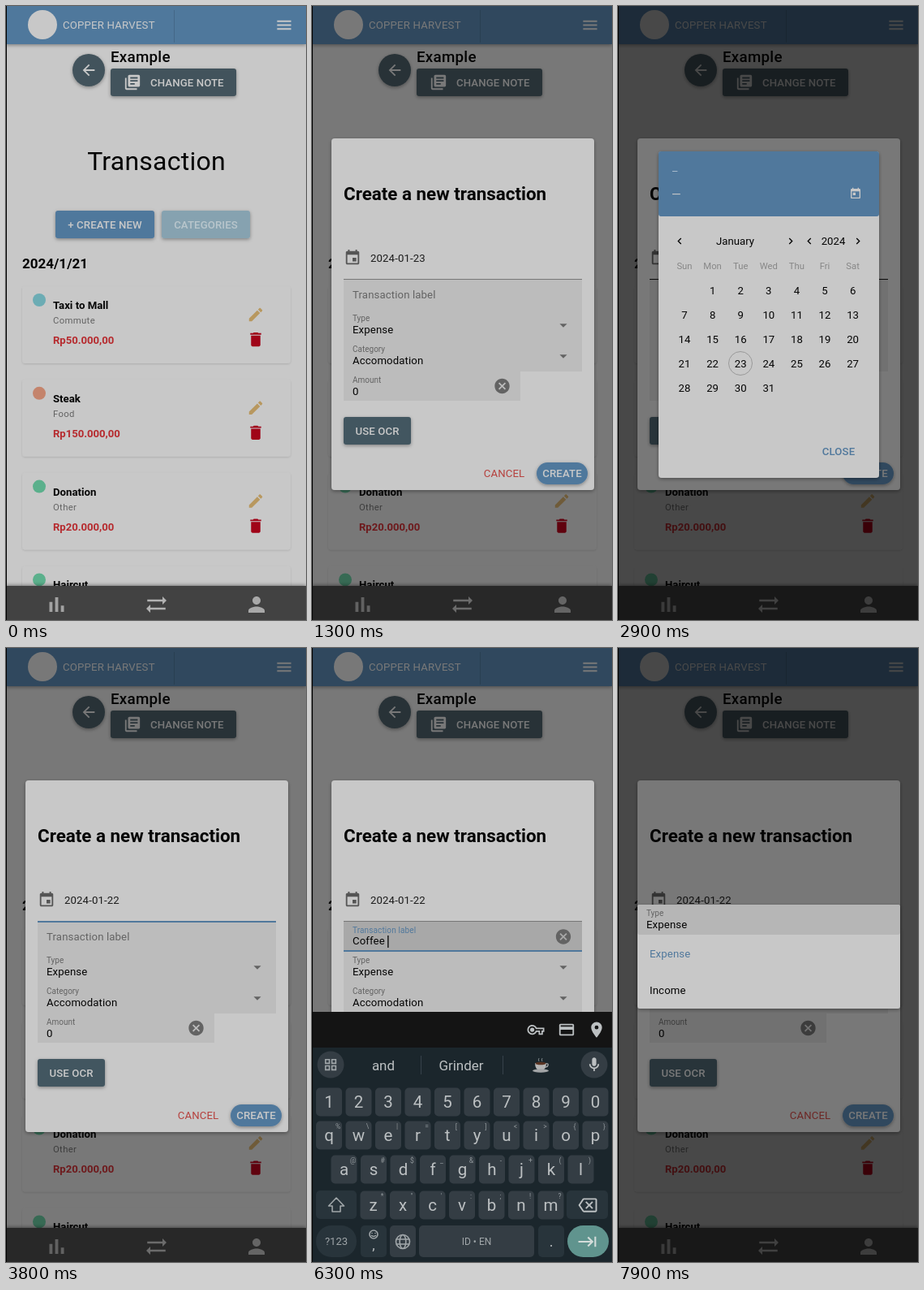
Recreate the animation shown at these times as an HTML page. Size 370 by 756 pixels, loop 8 s.

```html
<!DOCTYPE html>
<html lang="en">
<head>
<meta charset="utf-8">
<title>Expense tracker demo</title>
<style>
html, body { margin: 0; width: 100%; height: 100%; overflow: hidden; background: #000; }
svg { display: block; width: 370px; height: 756px; font-family: Roboto, Arial, sans-serif; }
text { white-space: pre; }
.scale { transform-box: fill-box; transform-origin: center; }
</style>
</head>
<body>
<svg id="stage" viewBox="0 0 370 756"></svg>
<script>
const LOOP = 8000;
const PAPER = '#c8c8c8', BLUE = '#50789c', SLATE = '#43535b', GREY = '#636363', INK = '#050505';
const ICONS = {
  menu: 'M3 18h18v-2H3zm0-5h18v-2H3zm0-7v2h18V6z',
  back: 'M20 11H7.83l5.59-5.59L12 4l-8 8 8 8 1.41-1.41L7.83 13H20z',
  books: 'M4 6H2v14c0 1.1.9 2 2 2h14v-2H4zm16-4H8c-1.1 0-2 .9-2 2v12c0 1.1.9 2 2 2h12c1.1 0 2-.9 2-2V4c0-1.1-.9-2-2-2zm-1 9H9V9h10zm-4 4H9v-2h6zm4-8H9V5h10z',
  edit: 'M3 17.25V21h3.75L17.81 9.94l-3.75-3.75zM20.71 7.04c.39-.39.39-1.02 0-1.41l-2.34-2.34c-.39-.39-1.02-.39-1.41 0l-1.83 1.83 3.75 3.75z',
  bin: 'M6 19c0 1.1.9 2 2 2h8c1.1 0 2-.9 2-2V7H6zM19 4h-3.5l-1-1h-5l-1 1H5v2h14z',
  chart: 'M4 9.2h3.4V20H4zM10.3 4h3.4v16h-3.4zM16.6 13H20v7h-3.4z',
  swap: 'M22 8l-4-4v3H3v2h15v3zM2 16l4 4v-3h15v-2H6v-3z',
  person: 'M12 12c2.21 0 4-1.79 4-4s-1.79-4-4-4-4 1.79-4 4 1.79 4 4 4zm0 2c-2.67 0-8 1.34-8 4v2h16v-2c0-2.66-5.33-4-8-4z',
  event: 'M17 12h-5v5h5zM16 1v2H8V1H6v2H5c-1.1 0-2 .9-2 2v14c0 1.1.9 2 2 2h14c1.1 0 2-.9 2-2V5c0-1.1-.9-2-2-2h-1V1zm3 18H5V8h14z',
  today: 'M19 3h-1V1h-2v2H8V1H6v2H5c-1.1 0-2 .9-2 2v14c0 1.1.9 2 2 2h14c1.1 0 2-.9 2-2V5c0-1.1-.9-2-2-2zm0 16H5V8h14zM7 10h5v5H7z',
  cancel: 'M12 2C6.47 2 2 6.47 2 12s4.47 10 10 10 10-4.47 10-10S17.53 2 12 2zm5 13.59L15.59 17 12 13.41 8.41 17 7 15.59 10.59 12 7 8.41 8.41 7 12 10.59 15.59 7 17 8.41 13.41 12z',
  drop: 'M7 10l5 5 5-5z',
  prev: 'M15.41 7.41L14 6l-6 6 6 6 1.41-1.41L10.83 12z',
  next: 'M10 6L8.59 7.41 13.17 12l-4.58 4.59L10 18l6-6z',
  key: 'M22 19h-6v-4h-2.68c-1.14 2.42-3.6 4-6.32 4-3.86 0-7-3.14-7-7s3.14-7 7-7c2.72 0 5.17 1.58 6.32 4H24v6h-2zm-4-2h2v-4h2v-2H11.94l-.23-.67C11.01 8.34 9.11 7 7 7c-2.76 0-5 2.24-5 5s2.24 5 5 5c2.11 0 4.01-1.34 4.71-3.33l.23-.67H18zM7 15a3 3 0 110-6 3 3 0 010 6z',
  card: 'M20 4H4c-1.1 0-2 .9-2 2v12c0 1.1.9 2 2 2h16c1.1 0 2-.9 2-2V6c0-1.1-.9-2-2-2zm0 14H4v-6h16zm0-10H4V6h16z',
  pin: 'M12 2C8.13 2 5 5.13 5 9c0 5.25 7 13 7 13s7-7.75 7-13c0-3.87-3.13-7-7-7zm0 9.5a2.5 2.5 0 110-5 2.5 2.5 0 010 5z',
  palette: 'M12 3a9 9 0 000 18c.83 0 1.5-.67 1.5-1.5 0-.39-.15-.74-.39-1.01-.23-.26-.38-.61-.38-.99 0-.83.67-1.5 1.5-1.5H16c2.76 0 5-2.24 5-5 0-4.42-4.03-8-9-8zM6.5 12a1.5 1.5 0 110-3 1.5 1.5 0 010 3zm3-4a1.5 1.5 0 110-3 1.5 1.5 0 010 3zm5 0a1.5 1.5 0 110-3 1.5 1.5 0 010 3zm3 4a1.5 1.5 0 110-3 1.5 1.5 0 010 3z',
  mic: 'M12 14c1.66 0 3-1.34 3-3V5c0-1.66-1.34-3-3-3S9 3.34 9 5v6c0 1.66 1.34 3 3 3zm5-3c0 2.76-2.24 5-5 5s-5-2.24-5-5H5c0 3.53 2.61 6.43 6 6.92V21h2v-3.08c3.39-.49 6-3.39 6-6.92z',
  erase: 'M22 3H7c-.69 0-1.23.35-1.59.88L0 12l5.41 8.11c.36.53.9.89 1.59.89h15c1.1 0 2-.9 2-2V5c0-1.1-.9-2-2-2zm0 16H7.07L2.4 12l4.66-7H22zm-11.59-2L14 13.41 17.59 17 19 15.59 15.41 12 19 8.41 17.59 7 14 10.59 10.41 7 9 8.41 12.59 12 9 15.59z',
  tab: 'M11.59 7.41L15.17 11H1v2h14.17l-3.59 3.59L13 18l6-6-6-6zM20 6v12h2V6z',
  grid: 'M3 3h8v8H3zm2 2v4h4V5zM13 3h8v8h-8zm2 2v4h4V5zM3 13h8v8H3zm2 2v4h4v-4zM13 13h8v8h-8zm2 2v4h4v-4z'
};

const rect = (x, y, w, h, fill, r = 0, more = '') =>
  `<rect x="${x}" y="${y}" width="${w}" height="${h}" rx="${r}" fill="${fill}" ${more}/>`;
const dot = (x, y, r, fill, more = '') => `<circle cx="${x}" cy="${y}" r="${r}" fill="${fill}" ${more}/>`;
const text = (x, y, s, size = 13.2, fill = INK, weight = 400, more = '') =>
  `<text x="${x}" y="${y}" font-size="${size}" fill="${fill}" font-weight="${weight}" ${more}>${s}</text>`;
const mid = (x, y, s, size, fill, weight, more = '') =>
  text(x, y, s, size, fill, weight, 'text-anchor="middle" ' + more);
const icon = (name, x, y, size, fill) =>
  `<path d="${ICONS[name]}" fill="${fill}" fill-rule="evenodd" transform="translate(${x - size / 2} ${y - size / 2}) scale(${size / 24})"/>`;
const group = (id, body, more = '') => `<g id="${id}" ${more}>${body}</g>`;
const shade = id => rect(0, 0, 370, 756, '#000', 0, `id="${id}"`);
const shadow = (id, dy, blur, alpha) =>
  `<filter id="${id}" x="-20%" y="-20%" width="140%" height="150%"><feDropShadow dx="0" dy="${dy}" stdDeviation="${blur}" flood-opacity="${alpha}"/></filter>`;
const SOFT = 'filter="url(#soft)"', TRACK = 'letter-spacing=".12"';

function button(x, y, w, h, label, fill, r = 3, color = PAPER) {
  return rect(x, y, w, h, fill, r, SOFT) + mid(x + w / 2, y + h / 2 + 4.7, label, 13.2, color, 500, TRACK);
}

function entry(i, name, kind, cost, color) {
  const y = 345 + i * 114.8;
  return rect(20, y, 331, 95, PAPER, 4, 'filter="url(#faint)"') + dot(41, y + 17, 8, color) +
    text(58, y + 28, name, 13.2, INK, 700) +
    text(58, y + 46, kind, 11.3, GREY, 400, 'letter-spacing=".35"') +
    text(58, y + 71, cost, 13.1, '#b62a2e', 700) +
    icon('edit', 308, y + 35, 22, '#b8985f') + icon('bin', 308, y + 65.5, 23, '#a00418');
}

function page() {
  return rect(0, 0, 370, 756, PAPER) +
    rect(0, 0, 370, 47, BLUE, 0, SOFT) + rect(207, 5, 1, 40, '#000', 0, 'opacity=".13"') +
    dot(45, 23, 18, PAPER) + text(70, 28, 'COPPER HARVEST', 13.2, PAPER, 400, 'letter-spacing=".2"') +
    icon('menu', 343, 23.5, 23, PAPER) +
    dot(102, 79, 20, SLATE, SOFT) + icon('back', 102, 79, 22, PAPER) +
    text(129, 69, 'Example', 18.8, INK, 500, 'letter-spacing=".24"') +
    rect(129, 77, 155, 34, SLATE, 3, SOFT) + icon('books', 156, 94, 22, PAPER) +
    text(178, 98.5, 'CHANGE NOTE', 13.2, PAPER, 500, TRACK) +
    mid(185.5, 202, 'Transaction', 32, INK, 400, 'letter-spacing=".23"') +
    button(61, 252, 122, 34, '+ CREATE NEW', BLUE) +
    rect(61, 252, 122, 34, '#fff', 3, 'id="press"') +
    button(192, 252, 109, 34, 'CATEGORIES', '#86a2b0', 3, '#b9c6cc') +
    text(20, 323, '2024/1/21', 17, INK, 700) +
    entry(0, 'Taxi to Mall', 'Commute', 'Rp50.000,00', '#6cacb4') +
    entry(1, 'Steak', 'Food', 'Rp150.000,00', '#c4846c') +
    entry(2, 'Donation', 'Other', 'Rp20.000,00', '#5bb08c') +
    entry(3, 'Haircut', 'Other', 'Rp40.000,00', '#5bb08c') +
    rect(0, 714, 370, 42, '#424242', 0, 'filter="url(#up)"') + icon('chart', 62.5, 737, 27, '#a2a2a2') +
    icon('swap', 185.5, 737, 30, '#b2b2b2') + icon('person', 309, 737, 30, '#a8a8a8');
}

function field(y, label, value) {
  return text(50, y, label, 10, GREY) + text(50, y + 15, value, 13.2, INK, 400, TRACK);
}

function form() {
  const fill = '#bcbcbc';
  return rect(24, 163, 324, 433, PAPER, 4, SOFT) +
    text(39, 239, 'Create a new transaction', 22.4, INK, 700) +
    icon('event', 50, 310, 22, '#555') +
    text(72, 314.6, '2024-01-23', 13.2, '#1c1c1c', 400, TRACK + ' id="date"') +
    rect(39, 337, 294, 113, fill) + rect(39, 450, 218, 36, fill) +
    rect(39, 337, 294, 37, '#a8a8a8', 0, 'id="focusFill"') +
    rect(39, 336, 294, 1, '#777', 0, 'id="dateLine"') +
    rect(39, 372, 294, 2, BLUE, 0, 'id="focusLine"') +
    text(50, 360, 'Transaction label', 13.2, GREY, 400, TRACK + ' id="label"') +
    text(50, 365, '', 13.2, INK, 400, TRACK + ' id="value"') +
    rect(50, 354, 1.3, 15, INK, 0, 'id="caret"') +
    group('clear', icon('cancel', 310, 355.5, 22, GREY)) +
    field(388, 'Type', 'Expense') + icon('drop', 310, 393, 22, GREY) +
    field(426, 'Category', 'Accomodation') + icon('drop', 310, 431, 22, GREY) +
    field(464, 'Amount', '0') + icon('cancel', 234.5, 468, 22, GREY) +
    button(39, 506, 83, 34, 'USE OCR', '#435761') +
    mid(237, 580, 'CANCEL', 13.2, '#b6423f', 400, TRACK) +
    button(277, 562, 63, 27, 'CREATE', BLUE, 13.5);
}

function calendar() {
  const colX = c => 82 + c * 34.6;
  let s = rect(50, 179, 272, 402, PAPER, 4, SOFT) + rect(50, 179, 272, 80, BLUE, 3) +
    text(66, 208, '–', 13, '#a9bccd', 400, 'id="pickYear"') + text(66, 237, '—', 15, PAPER, 400, 'id="pickDay"') +
    icon('today', 293, 231, 16, PAPER) +
    icon('prev', 76, 289.5, 16, INK) + mid(144.5, 294, 'January') + icon('next', 213, 289.5, 16, INK) +
    icon('prev', 236, 289.5, 16, INK) + mid(265.5, 294, '2024') + icon('next', 296, 289.5, 16, INK) +
    dot(151, 440, 14.5, 'none', 'stroke="#999"') + dot(colX(1), 440, 14.5, BLUE, 'id="picked"');
  'Sun Mon Tue Wed Thu Fri Sat'.split(' ').forEach((d, c) => s += mid(colX(c), 323.5, d, 11.3, '#878787'));
  for (let d = 1; d <= 31; d++)
    s += mid(colX(d % 7), 354.5 + Math.floor(d / 7) * 30, d, 13.2, INK, 400, d === 22 ? 'id="day22"' : '');
  return s + mid(272, 553, 'CLOSE', 13.2, BLUE, 500, TRACK);
}

function options() {
  return rect(24, 316, 324, 128, PAPER, 3, SOFT) + rect(24, 316, 324, 37, '#b6b6b6', 3) +
    text(35, 330, 'Type', 10, GREY) + text(35, 345, 'Expense', 13.2, INK, 400, TRACK) +
    text(39, 381, 'Expense', 13.2, BLUE, 400, TRACK) + text(39, 426, 'Income', 13.2, INK, 400, TRACK);
}

const KEY = '#343d44', DARK = '#28343b', LIGHT = '#bcc0c2', DULL = '#a0a6a9';
const keySpots = {};

function keyRow(chars, hints, x0, y) {
  return [...chars].map((c, i) => {
    const x = x0 + i * 36.5;
    keySpots[c] = [x - 16, y - 17.5, 32];
    const hint = hints[i] ? mid(x + 11, y - 8, hints[i].replace('<', '&lt;'), 8.5, '#90979b') : '';
    return rect(x - 16, y - 17.5, 32, 35, KEY, 5) + mid(x, y + 7.3, c, 20.5, LIGHT, 400, hints ? 'class="letter"' : '') + hint;
  }).join('');
}

function keyboard() {
  const line = `fill="none" stroke="${DULL}" stroke-width="1.6"`;
  const bare = (x, y) => `transform="translate(${x} ${y})" ${line}`;
  keySpots[' '] = [132, 711, 142];
  return rect(0, 448, 370, 45, '#141414') +
    group('fillIcons', icon('key', 274, 470, 21, LIGHT) + icon('card', 312, 470, 22, LIGHT) + icon('pin', 349, 470, 23, LIGHT)) +
    rect(0, 492, 370, 264, '#1b262c') +
    dot(23, 513, 16.5, '#343d44') + icon('grid', 23, 513, 19, DULL) +
    dot(348, 513, 16.5, '#343d44') + icon('mic', 348, 513, 21, LIGHT) +
    group('tools',
      `<g ${bare(77, 513)}><path d="M2 8H-8V-8H8V2zM2 8V2H8M-4 1Q0 5 3 0M-3-4v2M3-4v2"/></g>` +
      mid(131, 517.5, 'GIF', 12.5, DULL, 900, 'letter-spacing=".8"') +
      `<g transform="translate(185 513)" fill="none" stroke="${DULL}"><circle r="4.3" stroke-width="3.2"/><circle r="6.8" stroke-width="2.4" stroke-dasharray="3.5 3.62"/></g>` +
      rect(232, 506, 14, 14, DULL, 1) + icon('palette', 293, 513, 20, DULL)) +
    group('words', rect(134, 502, 1, 23, '#36424a') + rect(235, 502, 1, 23, '#36424a') +
      [88, 184, 282].map((x, i) => mid(x, 520, '', 17, LIGHT, 400, `id="word${i}"`)).join('') +
      group('cup', `<path d="M275 511h14q0 9-7 9t-7-9z" fill="#b4b4b4"/><path d="M288 512q4-1 3 2t-5 2" fill="none" stroke="#b4b4b4" stroke-width="1.2"/>` +
        `<ellipse cx="282" cy="511.500" rx="6.5" ry="1.8" fill="#5a3423"/><ellipse cx="282" cy="520.500" rx="10" ry="2.200" fill="#a2a4a6"/>` +
        `<path d="M280 509q-1.500-2 0-4M284 509q-1.500-2 0-4" fill="none" stroke="#7c8488"/>`)) +
    keyRow('1234567890', '', 21, 559) +
    keyRow('QWERTYUIOP', '%\\|=[]<>{}', 21, 600) +
    keyRow('ASDFGHJKL', '@#$_&-+()', 39.5, 642) +
    keyRow('ZXCVBNM', '*"\':;!?', 75.5, 686) +
    rect(5, 668, 50, 35, DARK, 5) +
    `<path id="shift" d="M30 677l9.500 10h-4.500v7h-10v-7h-4.500z" stroke="${DULL}" stroke-width="1.6" stroke-linejoin="round"/>` +
    rect(314, 668, 51, 35, DARK, 5) + icon('erase', 340, 686, 23, LIGHT) +
    rect(5, 711, 50, 39, DARK, 19) + mid(30, 735, '?123', 13, DULL) +
    rect(60, 711, 32, 39, DARK, 5) + `<g ${bare(76, 722)} stroke-width="1"><circle r="5"/><path d="M-3 1Q0 4 3 1M-2-2v1M2-2v1"/></g>` + mid(76, 741, ',', 17, LIGHT) +
    rect(96, 711, 32, 39, KEY, 5) + `<g ${bare(112, 731)}><circle r="8.500"/><ellipse rx="3.8" ry="8.500"/><path d="M-8-3H8M-8 3H8"/></g>` +
    rect(132, 711, 142, 39, KEY, 5) + mid(203, 735, 'ID • EN', 12, DULL) +
    rect(279, 711, 32, 39, DARK, 5) + mid(295, 737, '.', 18, LIGHT) +
    rect(315, 711, 51, 39, '#60948e', 19.5) + icon('tab', 340, 731, 25, '#d4dcda') +
    rect(0, 0, 0, 38, '#fff', 5, 'id="keyGlow"');
}

const stage = document.getElementById('stage');
stage.innerHTML =
  `<defs>${shadow('soft', 1.5, 1.9, .36)}${shadow('faint', 1, 1.3, .14)}${shadow('up', -1, 2, .4)}</defs>` +
  page() + shade('shade1') + group('form', form(), 'class="scale"') +
  shade('shade2') + group('calendar', calendar(), 'class="scale"') + group('options', options()) +
  group('keyboard', keyboard()) + rect(0, 0, 1, 756, '#000');

const ui = {};
stage.querySelectorAll('[id]').forEach(e => ui[e.id] = e);
const letters = [...stage.querySelectorAll('.letter')];

// when each step of the visit starts, in ms
const AT = { press: 820, form: 1000, calendar: 2200, pick: 3300, pickEnd: 3600, focus: 4200, blur: 7300, options: 7580 };

// time, key, suggestions
const TYPING = [
  [4950, 'C', 'Can', 'C', 'Could'],
  [5180, 'o', 'Come', 'Co', 'Could'],
  [5400, 'f', 'Coffee', 'Cof', 'Coff'],
  [5560, 'f', 'Coffee', 'Coff', 'Coffe'],
  [5740, 'e', 'Coffee', 'Coffe', 'Coffees'],
  [5900, 'e', 'Coffees', 'Coffee', 'Coffee’s'],
  [6100, ' ', 'and', 'Grinder', '']
];

const ramp = (t, from, to) => Math.min(1, Math.max(0, (t - from) / (to - from)));
const ease = p => 1 - (1 - p) ** 3;
const span = (t, inAt, outAt, ms = 250) => ease(ramp(t, inAt, inAt + ms)) * (1 - ease(ramp(t, outAt, outAt + ms)));
const set = (el, name, v) => ui[el].setAttribute(name, v);
const show = (el, on) => ui[el].style.display = on ? '' : 'none';
const put = (el, s) => { if (ui[el].textContent !== s) ui[el].textContent = s; };

function pop(el, p) {
  show(el, p > 0);
  ui[el].style.opacity = p;
  ui[el].style.transform = `scale(${p})`;
}

function drawDialogs(t) {
  set('press', 'opacity', .2 * span(t, AT.press, AT.press + 150, 120));

  const formIn = span(t, AT.form, LOOP);
  set('shade1', 'opacity', .4 * formIn);
  pop('form', formIn);

  const calIn = span(t, AT.calendar, AT.pickEnd, 200), optIn = span(t, AT.options, LOOP, 220);
  set('shade2', 'opacity', .4 * Math.max(calIn, optIn));
  pop('calendar', calIn);
  show('options', optIn > 0);
  ui.options.style.opacity = optIn;

  const chosen = t >= AT.pick;
  show('picked', chosen);
  set('day22', 'fill', chosen ? PAPER : INK);
  put('pickYear', chosen ? '2024' : '–');
  put('pickDay', chosen ? 'Mon, Jan 22' : '—');
  put('date', chosen ? '2024-01-22' : '2024-01-23');
  const dateFocus = t >= AT.pickEnd && t < AT.focus;
  set('dateLine', 'fill', dateFocus ? BLUE : t >= AT.calendar && t < AT.pickEnd ? '#111' : '#777');
  set('dateLine', 'height', dateFocus ? 2 : 1);
}

function drawTyping(t) {
  const focus = t >= AT.focus && t < AT.blur;
  const done = TYPING.filter(k => t >= k[0]), last = done[done.length - 1];
  const value = done.map(k => k[1]).join('');
  const lift = ease(ramp(t, AT.focus, AT.focus + 200));
  show('focusFill', focus);
  show('focusLine', focus);
  set('label', 'font-size', 13.2 - 3.2 * lift);
  set('label', 'y', 360 - 9.5 * lift);
  set('label', 'fill', focus ? BLUE : GREY);
  put('value', value);
  show('clear', value);
  show('caret', focus && (t - (last ? last[0] : AT.focus + 100)) % 1000 < 500);
  set('caret', 'x', 50 + (value ? ui.value.getComputedTextLength() : 0));

  const kb = span(t, AT.focus, AT.blur, 230);
  show('keyboard', kb > 0);
  set('keyboard', 'transform', `translate(0 ${309 * (1 - kb)})`);
  set('fillIcons', 'transform', `translate(${last ? 2 : 0} 0)`);
  show('tools', !last);
  show('words', last);
  for (let i = 0; i < 3; i++) put('word' + i, last ? last[2 + i] : '');
  show('cup', last && !last[4]);
  set('shift', 'fill', last ? 'none' : DULL);
  letters.forEach(e => {
    const c = last ? e.textContent.toLowerCase() : e.textContent.toUpperCase();
    if (e.textContent !== c) e.textContent = c;
  });
  set('keyGlow', 'opacity', last ? .18 * (1 - ramp(t, last[0] + 50, last[0] + 140)) : 0);
  if (last) {
    const [x, y, w] = keySpots[last[1].toUpperCase()];
    set('keyGlow', 'x', x);
    set('keyGlow', 'y', y);
    set('keyGlow', 'width', w);
  }
}

const start = performance.now();
function tick() {
  const t = (performance.now() - start) % LOOP;
  drawDialogs(t);
  drawTyping(t);
  requestAnimationFrame(tick);
}
tick();
</script>
</body>
</html>
```
